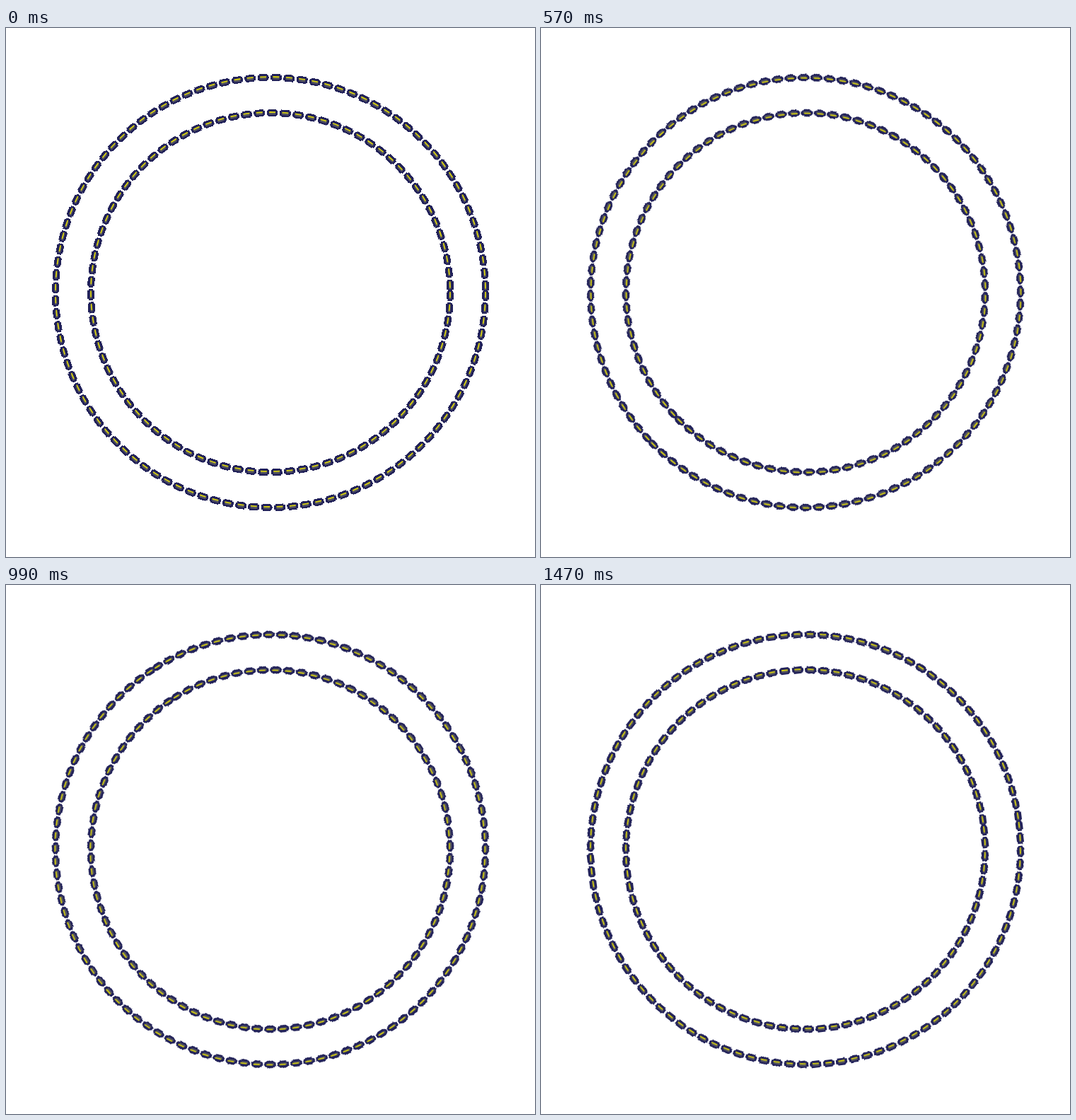
Recreate the animation shown at these times as an HTML page. Size 748x748 px, loop 1500 ms.

```html
<!DOCTYPE html>
<html lang="en">
<head>
<meta charset="utf-8">
<title>Rotating chain rings</title>
<style>
  html, body { margin: 0; width: 100%; height: 100%; overflow: hidden; background: #fff; }
  svg { display: block; width: 748px; height: 748px; }
  #ring { transform-origin: 0 0; }
</style>
</head>
<body>
<svg viewBox="-374 -374 748 748">
  <g id="ring" fill="none"></g>
</svg>
<script>
const TURN = 1500, NAVY = '#22225a', MID = 4;
const RINGS = [{ r: 304, pitch: 18.41 }, { r: 254, pitch: 18.385 }];
const ring = document.getElementById('ring');

// Dash style with every dash centred MID px after its pitch mark.
const dashStyle = (len, width, pitch) => ({
  strokeWidth: `${width}px`,
  strokeDasharray: `${len}px ${pitch - len}px`,
  strokeDashoffset: `${len / 2 - MID}px`
});

function layer(color, [len, width], { dy = 0, cap = 'butt', crisp = false, to } = {}) {
  for (const { r, pitch } of RINGS) {
    const c = document.createElementNS('http://www.w3.org/2000/svg', 'circle');
    c.setAttribute('r', r);
    c.setAttribute('cy', dy);
    c.setAttribute('stroke', color);
    c.setAttribute('stroke-linecap', cap);
    if (crisp) c.setAttribute('shape-rendering', 'crispEdges');
    const from = dashStyle(len, width, pitch);
    Object.assign(c.style, from);
    ring.append(c);
    // The outline goes from blocky to tapered and back in each quarter turn.
    if (to) c.animate([from, dashStyle(...to, pitch)],
      { duration: TURN / 8, iterations: Infinity, direction: 'alternate' });
  }
}

layer(NAVY, [8, 8], { cap: 'round', crisp: true });
layer(NAVY, [11.5, 10], { crisp: true, to: [8, 10.4] });
layer(NAVY, [15.6, 6.5], { crisp: true, to: [16.8, 4] });
layer('#55555f', [9, 3], { dy: 1 });
layer('#d6d010', [9, 1.8], { dy: -1 });

ring.animate(
  [{ transform: 'rotate(0deg)' }, { transform: 'rotate(360deg)' }],
  { duration: TURN, iterations: Infinity, easing: 'steps(50, end)' }
);
</script>
</body>
</html>
```
